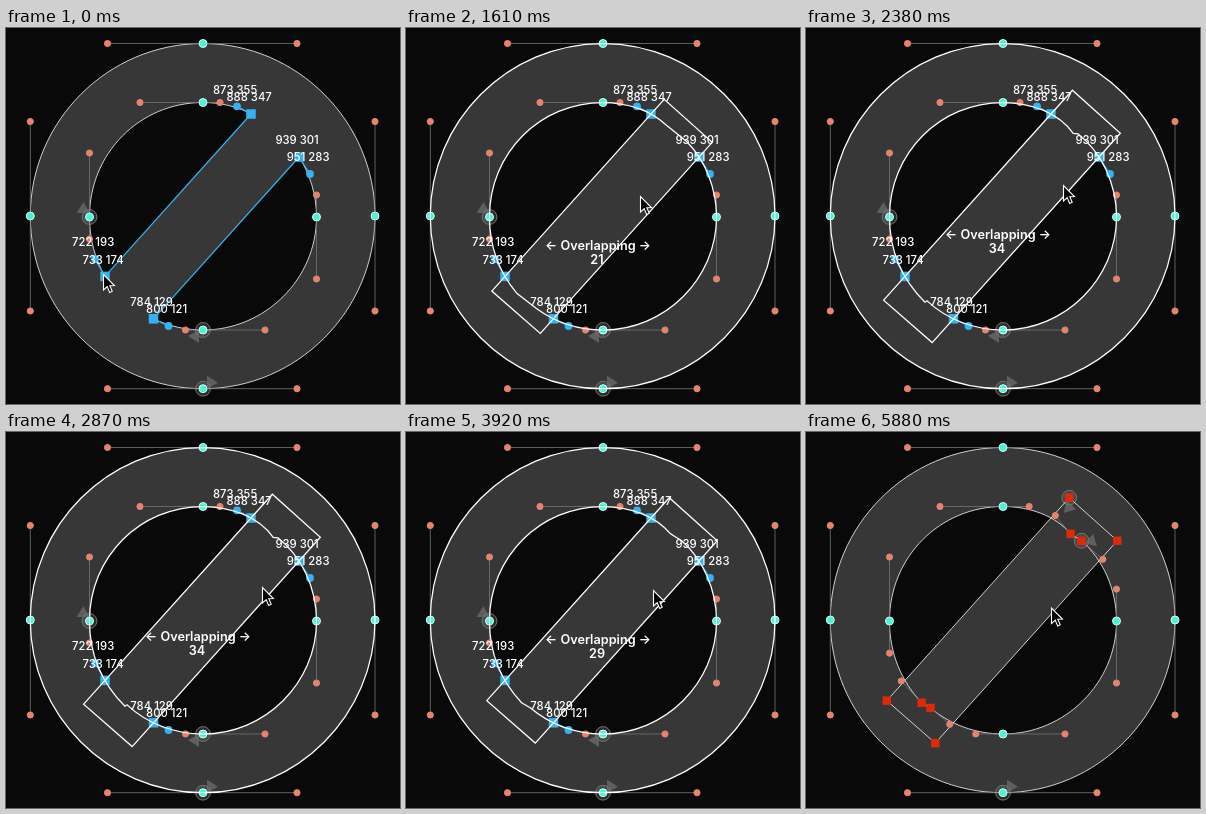
These frames come from a looping animation (394 px wide and 376 px high, 5950 ms). An HTML page with a canvas:

```html
<!DOCTYPE html>
<html lang="en">
<head>
<meta charset="utf-8">
<title>Overlapping strokes</title>
<style>
  html, body { margin: 0; width: 100%; height: 100%; overflow: hidden; background: #090909; }
  canvas { display: block; width: 394px; height: 376px; }
</style>
</head>
<body>
<canvas id="stage"></canvas>
<script>
const canvas = document.getElementById('stage');
const ctx = canvas.getContext('2d');
const ratio = window.devicePixelRatio || 1;
canvas.width = 394 * ratio;
canvas.height = 376 * ratio;

const LOOP = 5950, STEP = 70, GRAB = 910, DROP = 5110;
const SCALE = 0.94; // pixels per font unit
const BLACK = '#090909', GRAY = '#373737', THIN = 'rgba(255,255,255,.78)';
const BLUE = '#35b2f2', TEAL = '#4ff0d6', CORAL = '#e8826a', RED = '#dc2a0a';

// Cursor path: time, x, y
const cursorKeys = [
  [0, 97, 246], [420, 221, 202], [490, 221, 202], [840, 191, 171],
  [1610, 234, 168], [2380, 257, 157], [2590, 264, 155], [2660, 264, 155],
  [2870, 256, 155], [3290, 249, 157], [3640, 249, 157],
  [3920, 247, 158], [5600, 247, 158], [5880, 245, 175.5], [LOOP, 245, 175.5]
];

const top_ = [197, 74.5], right = [310.5, 189], bottom = [197, 302], left = [83.5, 189];
// Counter curves that run into the bar, with growth of t per unit of overlap
const curves = [
  { p: [top_, [214, 74.5], [231, 78.3], [245, 86]], k: 0.0186, label: ['873 355', '888 347'] },
  { p: [right, [310.5, 167], [304, 146], [293, 129]], k: 0.0155, label: ['951 283', '939 301'] },
  { p: [bottom, [179.5, 302], [162.5, 298], [147.5, 290.8]], k: 0.0192, label: ['800 121', '784 129'] },
  { p: [left, [83.5, 211], [89, 231], [99, 248.4]], k: 0.0159, label: ['722 193', '733 174'] }
];
const [cTop, cRight, cBottom, cLeft] = curves;
const fixedHandles = [
  [top_, [134, 74.5]], [right, [310.5, 251]], [bottom, [259, 302]], [left, [83.5, 125]]
];
const outerNodes = [[197, 15.5], [369, 188], [197, 360.7], [24.3, 188]];
const outerHandles = [
  [[101.5, 15.5], [291, 15.5]], [[369, 93.5], [369, 283]],
  [[291, 360.7], [101.5, 360.7]], [[24.3, 283], [24.3, 93.5]]
];

const mix = (a, b, t) => a.map((v, i) => v + (b[i] - v) * t);

function cursorAt(time) {
  const i = cursorKeys.findIndex(key => key[0] > time);
  const a = cursorKeys[i - 1], b = cursorKeys[i];
  return mix(a, b, (time - a[0]) / (b[0] - a[0])).slice(1);
}

// Follow a curve beyond its end point
function extend({ p: [a, b, c, d], k }, n) {
  const t = 1 + k * n;
  const ab = mix(a, b, t), bc = mix(b, c, t), cd = mix(c, d, t);
  const abc = mix(ab, bc, t), bcd = mix(bc, cd, t);
  return [a, ab, abc, mix(abc, bcd, t)];
}

function barCorners(n) {
  const edge = (a, b) => {
    const s = n * SCALE / Math.hypot(b[0] - a[0], b[1] - a[1]);
    return [mix(a, b, -s), mix(a, b, 1 + s)];
  };
  const [a, b] = edge(cLeft.p[3], cTop.p[3]);
  const [d, c] = edge(cBottom.p[3], cRight.p[3]);
  return [a, b, c, d];
}

function outerPath() {
  const path = new Path2D();
  path.moveTo(...outerNodes[0]);
  outerNodes.forEach((node, i) => {
    const j = (i + 1) % 4;
    path.bezierCurveTo(...outerHandles[i][1], ...outerHandles[j][0], ...outerNodes[j]);
  });
  path.closePath();
  return path;
}

function counterPath(n, open) {
  const path = new Path2D();
  const [t, r, b, l] = curves.map(c => extend(c, n));
  const join = open ? 'moveTo' : 'lineTo';
  const forth = c => path.bezierCurveTo(...c[1], ...c[2], ...c[3]);
  const back = c => path.bezierCurveTo(...c[2], ...c[1], ...c[0]);
  path.moveTo(...left);
  path.bezierCurveTo(83.5, 125, 134, 74.5, ...top_);
  forth(t);
  path[join](...r[3]);
  back(r);
  path.bezierCurveTo(310.5, 251, 259, 302, ...bottom);
  forth(b);
  path[join](...l[3]);
  back(l);
  return path;
}

function polygon(points) {
  const path = new Path2D();
  points.forEach(p => path.lineTo(...p));
  path.closePath();
  return path;
}

function fill(path, color) {
  ctx.fillStyle = color;
  ctx.fill(path);
}

function stroke(path, color, width) {
  ctx.strokeStyle = color;
  ctx.lineWidth = width;
  ctx.stroke(path);
}

function line(a, b, color, width) {
  const path = new Path2D();
  path.moveTo(...a);
  path.lineTo(...b);
  stroke(path, color, width);
}

function dot([x, y], r, color, edge) {
  const path = new Path2D();
  path.arc(x, y, r, 0, 7);
  fill(path, color);
  if (edge) stroke(path, edge, 1);
}

function square([x, y], size, color) {
  ctx.fillStyle = color;
  ctx.fillRect(x - size / 2, y - size / 2, size, size);
}

const tealNode = p => dot(p, 4, TEAL, '#c9fff4');

function handle(node, end) {
  line(node, end, '#757575', 0.8);
  dot(end, 3.1, CORAL, '#d98674');
}

function startMark([x, y], angle) {
  ctx.save();
  ctx.translate(x, y);
  ctx.rotate(angle);
  fill(polygon([[4, -13], [15, -6], [4, 0]]), '#5f5f5f');
  ctx.restore();
  dot([x, y], 7.4, 'rgba(110,110,110,.35)', '#737373');
}

function text(str, x, y, font) {
  ctx.font = font + ' Inter, "Open Sans", sans-serif';
  ctx.fillStyle = '#fff';
  ctx.fillText(str, x, y);
}

function drawCursor([x, y]) {
  ctx.save();
  ctx.translate(x, y);
  const arrow = polygon([[0.5, 0.5], [0.5, 16], [4.2, 12.6], [6.7, 18.4], [9.2, 17.3], [6.8, 11.7], [11.4, 11.5]]);
  fill(arrow, '#000');
  stroke(arrow, '#fff', 1.1);
  ctx.restore();
}

function draw(time) {
  const cursor = cursorAt(time);
  const dragging = time >= GRAB && time < DROP;
  const done = time >= DROP;
  const n = done ? 29 : dragging ? Math.max(0, Math.ceil((cursor[0] - 197) * 0.565)) : 0;
  const outer = outerPath(), bar = barCorners(n);

  ctx.setTransform(ratio, 0, 0, ratio, 0, 0);
  ctx.fillStyle = BLACK;
  ctx.fillRect(0, 0, 394, 376);
  fill(outer, GRAY);
  fill(counterPath(0), BLACK);
  fill(polygon(barCorners(3)), GRAY);

  startMark(outerNodes[2], 0);
  if (done) {
    startMark(bar[1], 2.3);
    startMark(extend(cRight, n)[3], 0.72);
  } else {
    startMark(left, -Math.PI / 2);
    startMark(bottom, Math.PI);
  }

  if (!dragging) {
    stroke(outer, THIN, 1);
    stroke(counterPath(n, !done), THIN, 1);
    if (done) {
      stroke(polygon(bar), THIN, 1);
    } else {
      line(bar[0], bar[1], BLUE, 1.2);
      line(bar[2], bar[3], BLUE, 1.2);
    }
  }

  outerNodes.forEach((node, i) => outerHandles[i].forEach(end => handle(node, end)));
  fixedHandles.forEach(([node, end]) => handle(node, end));
  curves.forEach(c => {
    const [a, b, d, e] = done ? extend(c, n) : c.p;
    handle(a, b);
    if (done) {
      handle(e, d);
      square(e, 8.5, RED);
    } else {
      line(d, e, BLUE, 1.2);
      dot(d, 3.9, BLUE);
      square(e, 9.5, BLUE);
    }
  });
  if (done) bar.forEach(p => square(p, 8.5, RED));
  [...outerNodes, top_, right, bottom, left].forEach(tealNode);

  if (dragging) {
    [outer, counterPath(n), polygon(bar)].forEach(path => stroke(path, '#fff', 1.25));
  }

  ctx.textAlign = 'center';
  if (!done) {
    curves.forEach(({ p, label }) => label.forEach((str, i) => {
      const [x, y] = p[i + 2];
      text(str, x - 1.9, y - 12.6, '500 11.3px');
    }));
  }
  if (dragging) {
    text('← Overlapping →', 192, cursor[1] + 53.8, '600 12.7px');
    text(n, 191, cursor[1] + 68, '600 12.7px');
  }
  drawCursor(cursor);
}

function tick(now) {
  const time = now % LOOP;
  draw(Math.floor(time / STEP) * STEP);
  requestAnimationFrame(tick);
}
requestAnimationFrame(tick);
</script>
</body>
</html>
```
